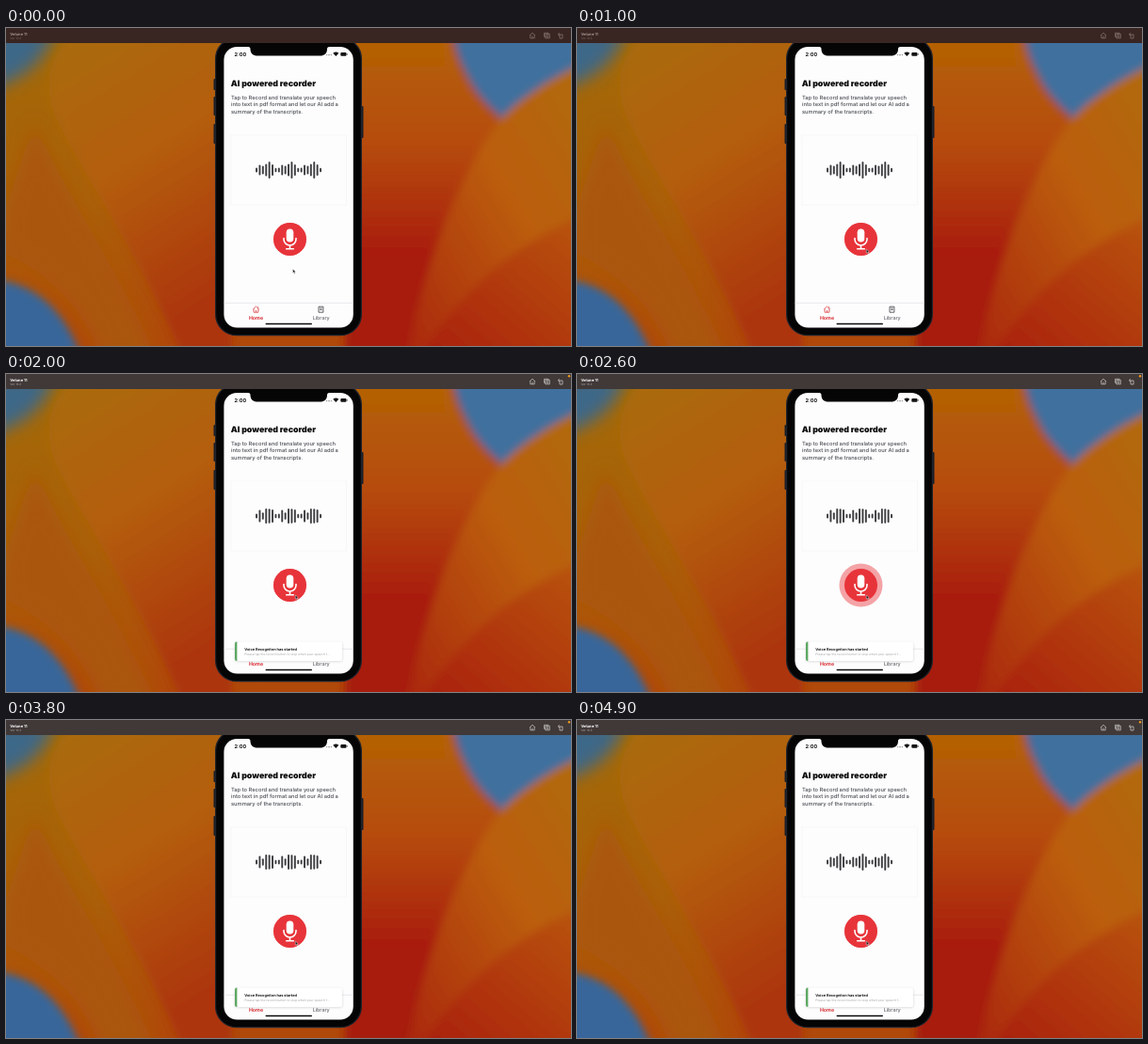
An HTML page for the animation above (5000 ms loop, 600x338 px).

```html
<!DOCTYPE html>
<html lang="en">
<head>
<meta charset="utf-8">
<title>Voice recorder demo</title>
<style>
html, body { margin: 0; width: 100%; height: 100%; overflow: hidden; background: #b05a08; }
svg { display: block; width: 100vw; height: 100vh; font-family: Inter, Roboto, sans-serif; text-rendering: geometricPrecision; }
</style>
</head>
<body>
<svg viewBox="0 0 600 338" preserveAspectRatio="none">
  <defs>
    <linearGradient id="base" x1="0" x2="0" y1="0" y2="1">
      <stop offset="0" stop-color="#a26a08"/>
      <stop offset=".55" stop-color="#aa6008"/>
      <stop offset="1" stop-color="#b0480a"/>
    </linearGradient>
    <linearGradient id="leftPetal" x1="0" x2=".35" y1="0" y2="1">
      <stop offset="0" stop-color="#a86c07"/>
      <stop offset=".5" stop-color="#b45e07"/>
      <stop offset="1" stop-color="#ac360b"/>
    </linearGradient>
    <linearGradient id="topPetal" x1="0" x2="0" y1="0" y2="1">
      <stop offset="0" stop-color="#b46406"/>
      <stop offset=".35" stop-color="#b64c08"/>
      <stop offset=".7" stop-color="#a81b0b"/>
      <stop offset="1" stop-color="#a61d0b"/>
    </linearGradient>
    <linearGradient id="rightPetal" x1="1" x2="0" y1="0" y2="1">
      <stop offset="0" stop-color="#b06c08"/>
      <stop offset=".45" stop-color="#bb5d07"/>
      <stop offset="1" stop-color="#aa250b"/>
    </linearGradient>
    <linearGradient id="lowPetal" x1="1" x2="0" y1="0" y2="1">
      <stop offset="0" stop-color="#b9580a"/>
      <stop offset=".6" stop-color="#b0340b"/>
      <stop offset="1" stop-color="#a81f0b"/>
    </linearGradient>
    <filter id="soft" x="-50%" y="-50%" width="200%" height="200%"><feGaussianBlur stdDeviation="9"/></filter>
    <filter id="mild" x="-50%" y="-50%" width="200%" height="200%"><feGaussianBlur stdDeviation="4"/></filter>
    <filter id="shade" x="-10%" y="-40%" width="120%" height="190%"><feGaussianBlur stdDeviation="1.4"/></filter>
    <clipPath id="screen"><rect x="231.400" y="20" width="137.400" height="298.600" rx="14"/></clipPath>
    <clipPath id="card"><rect x="243" y="284.500" width="114" height="20.500" rx="2"/></clipPath>
  </defs>

  <!-- Wallpaper -->
  <rect width="600" height="338" fill="url(#base)"/>
  <g filter="url(#soft)">
    <path d="M30 100C60 170 110 240 160 350H100C80 290 40 260 0 240V190Z" fill="#aa560a"/>
    <path d="M-20 0H52C44 30 26 52 -20 66Z" fill="#3d6788"/>
  </g>
  <g filter="url(#mild)">
    <path d="M240 0H75C45 30 36 60 55 100C85 160 140 240 188 350H240Z" fill="url(#leftPetal)"/>
    <path d="M-20 267C30 268 62 300 80 350H-20Z" fill="#39669a"/>
    <path d="M465 0H620V130H530Z" fill="#41709e"/>
    <path d="M360 0H473C478 45 500 78 526 98C480 160 450 240 430 350H360Z" fill="url(#topPetal)"/>
    <path d="M474 10C480 48 502 78 524 95" fill="none" stroke="#a04a38" stroke-width="4"/>
    <path d="M620 34C580 52 545 75 524 98C480 160 448 240 425 350H620Z" fill="url(#rightPetal)"/>
    <path d="M620 195C560 220 490 265 440 350H620Z" fill="url(#lowPetal)"/>
  </g>

  <!-- Device -->
  <g fill="#1b1f28">
    <rect x="220.500" y="54" width="3" height="12" rx="1"/>
    <rect x="220.500" y="73" width="3" height="20" rx="1"/>
    <rect x="220.500" y="102" width="3" height="21" rx="1"/>
    <rect x="376.500" y="83" width="3" height="34" rx="1"/>
  </g>
  <rect x="222.600" y="10.600" width="154.800" height="316" rx="22" fill="#050506" stroke="#20242c" stroke-width="1.200"/>
  <g clip-path="url(#screen)">
    <rect x="231" y="20" width="138" height="299" fill="#fdfdfe"/>
    <path d="M257 20C259 20 259.500 21 259.500 22.500C259.500 27 262.500 29.500 267 29.500H333.500C338 29.500 341 27 341 22.500C341 21 341.500 20 343.500 20Z" fill="#050506"/>
    <text x="242.500" y="30" font-size="5.500" font-weight="700" fill="#111">2:00</text>
    <g fill="#111">
      <g id="signal"></g>
      <path d="M347.300 26.700Q350.300 24.300 353.300 26.700L350.300 30Z"/>
      <rect x="355.300" y="25.900" width="6.200" height="3.900" rx="1"/>
      <rect x="361.900" y="27.100" width=".6" height="1.500"/>
    </g>

    <text x="238.800" y="61.700" font-size="8.850" font-weight="900" fill="#0b0b0c">AI powered recorder</text>
    <g font-size="5.750" font-weight="500" fill="#484c51">
      <text x="239" y="76.200">Tap to Record and translate your speech</text>
      <text x="239" y="83.400">into text in pdf format and let our AI add a</text>
      <text x="239" y="90.600">summary of the transcripts.</text>
    </g>
    <rect x="239" y="114" width="122.500" height="74" fill="none" stroke="#f5f5f6" stroke-width=".8"/>
    <g id="wave" fill="#3d3d40"></g>

    <circle id="pulse" cx="301.500" cy="224.500" r="17.500" fill="#e8353a" opacity=".45"/>
    <circle cx="301.500" cy="224.500" r="17.500" fill="#e7343a"/>
    <rect x="297.700" y="213.500" width="7.600" height="14" rx="3.800" fill="#fff"/>
    <path d="M295 223.500V224.500A6.500 6.500 0 0 0 308 224.500V223.500M301.500 231V234.500M297.700 234.800H305.300" fill="none" stroke="#fff" stroke-width="1.600" stroke-linecap="round"/>

    <!-- Tab bar -->
    <path d="M231 292.300H369" stroke="#dcdcde" stroke-width=".6"/>
    <g id="icons" fill="none" stroke-width=".8" stroke-linejoin="round">
      <path d="M262.300 299L265.500 296L268.700 299M263.100 298.500V302.200H267.900V298.500M265.500 302.200V300M267.700 297.800V296.300" stroke="#d9393c"/>
      <path d="M332 296.200H336.900V302.200H332ZM333.300 298H335.600M333.300 299.400H335.600" stroke="#3c3c40"/>
    </g>
    <g font-size="5.300" text-anchor="middle">
      <text x="265.500" y="309.600" font-weight="700" fill="#d92f34">Home</text>
      <text x="334.700" y="309.600" font-weight="600" fill="#77777c">Library</text>
    </g>

    <g id="toast">
      <rect x="243" y="285.500" width="114" height="20" rx="2" fill="#000" opacity=".16" filter="url(#shade)"/>
      <g clip-path="url(#card)">
        <rect x="243" y="284" width="114" height="22" fill="#fff"/>
        <rect x="243" y="284" width="2.400" height="22" fill="#5da863"/>
      </g>
      <text x="253.300" y="294" font-size="3.900" font-weight="700" fill="#151517">Voice Recogniton has started</text>
      <text x="253.300" y="298.600" font-size="3.300" fill="#a2a2a6">Please tap the record button to stop when your speech f...</text>
    </g>
    <rect x="275.500" y="313.700" width="49.500" height="1.600" rx=".8" fill="#08080a"/>
  </g>

  <!-- Window bar -->
  <rect id="bar" width="600" height="16"/>
  <text id="device" x="4.200" y="7.600" font-size="4.100" font-weight="700">Velune 11</text>
  <text id="version" x="4.200" y="12" font-size="3.200">Ver 16.2</text>
  <g id="tools" fill="none" stroke-width=".75" stroke-linejoin="round">
    <path d="M556 8L559 5.200L562 8M556.800 7.500V10.800H561.200V7.500M559 10.800V8.500"/>
    <path d="M572.800 9.300H571.500V5.300H576V6.200M572.800 6.400H577.300V10.800H572.800Z"/>
    <circle cx="575" cy="8.600" r="1"/>
    <path d="M587 7H591V11H588V7M587.700 5.200L586.200 6.900L588 8"/>
  </g>
  <circle id="live" cx="598" cy="2.200" r="1.200" fill="#f79a1c"/>

  <path id="cursor" d="M0 0V4.200L1 3.300L1.700 4.900L2.500 4.500L1.800 3H3.100Z" fill="#08080a" stroke="#fff" stroke-width=".45"/>
</svg>
<script>
const LOOP = 5000, STEP = 100;
const NS = "http://www.w3.org/2000/svg";
const $ = id => document.getElementById(id);
const set = (el, attrs) => {
  for (const key in attrs) el.setAttribute(key, attrs[key]);
  return el;
};
const add = (parent, tag, attrs) =>
  parent.appendChild(set(document.createElementNS(NS, tag), attrs));

const clamp = v => Math.max(0, Math.min(1, v));
const ramp = (t, from, to) => clamp((t - from) / (to - from));
const smooth = v => v * v * (3 - 2 * v);
const easeOut = v => 1 - (1 - v) ** 3;
const mix = (a, b, k) => a + (b - a) * k;

// Bar heights of one wave group, before and while recording
const idle = [5, 11, 9, 13, 18, 12, 4.5];
const active = [5, 13, 7.5, 16, 15.5, 14, 4.5];
const bars = Array.from({ length: 21 }, (_, i) =>
  add($("wave"), "rect", { x: 265.1 + i * 3.4, width: 1.9, rx: 0.9 }));
for (let i = 0; i < 4; i++) add($("signal"), "circle", { cx: 340.6 + i * 1.6, cy: 28.8, r: 0.45 });

function drawBar(t) {
  const focused = t >= 1300;
  set($("bar"), { fill: focused ? "#403938" : "#392522" });
  set($("device"), { fill: focused ? "#fff" : "#a1928e" });
  set($("version"), { fill: focused ? "#aaa4a3" : "#776863" });
  set($("tools"), { stroke: focused ? "#c9c4c3" : "#877773" });
  set($("live"), { opacity: t >= 1900 ? 1 : 0 });
}

function drawWave(t) {
  const level = smooth(ramp(t, 1600, 2000)) * (1 - smooth(ramp(t, 4200, 4800)));
  bars.forEach((bar, i) => {
    const h = mix(idle[i % 7], active[i % 7], level);
    set(bar, { y: 151 - h / 2, height: h });
  });
}

function render(t) {
  drawBar(t);
  drawWave(t);

  const move = smooth(ramp(t, 0, 600));
  set($("cursor"), { transform: `translate(${mix(304.6, 307.3, move)} ${mix(256.3, 235, move)})` });

  const beat = Math.sin(Math.PI * ramp(t, 2200, 3000));
  set($("pulse"), { r: 17.5 + 5.5 * beat });

  const rise = easeOut(ramp(t, 1500, 1950));
  set($("toast"), { transform: `translate(0 ${mix(40, 0, rise)})`, opacity: rise > 0 ? 1 : 0 });
  set($("icons"), { opacity: rise > 0.8 ? 0 : 1 });
}

function tick(now) {
  render(Math.floor((now % LOOP) / STEP) * STEP);
  requestAnimationFrame(tick);
}
render(0);
requestAnimationFrame(tick);
</script>
</body>
</html>
```
